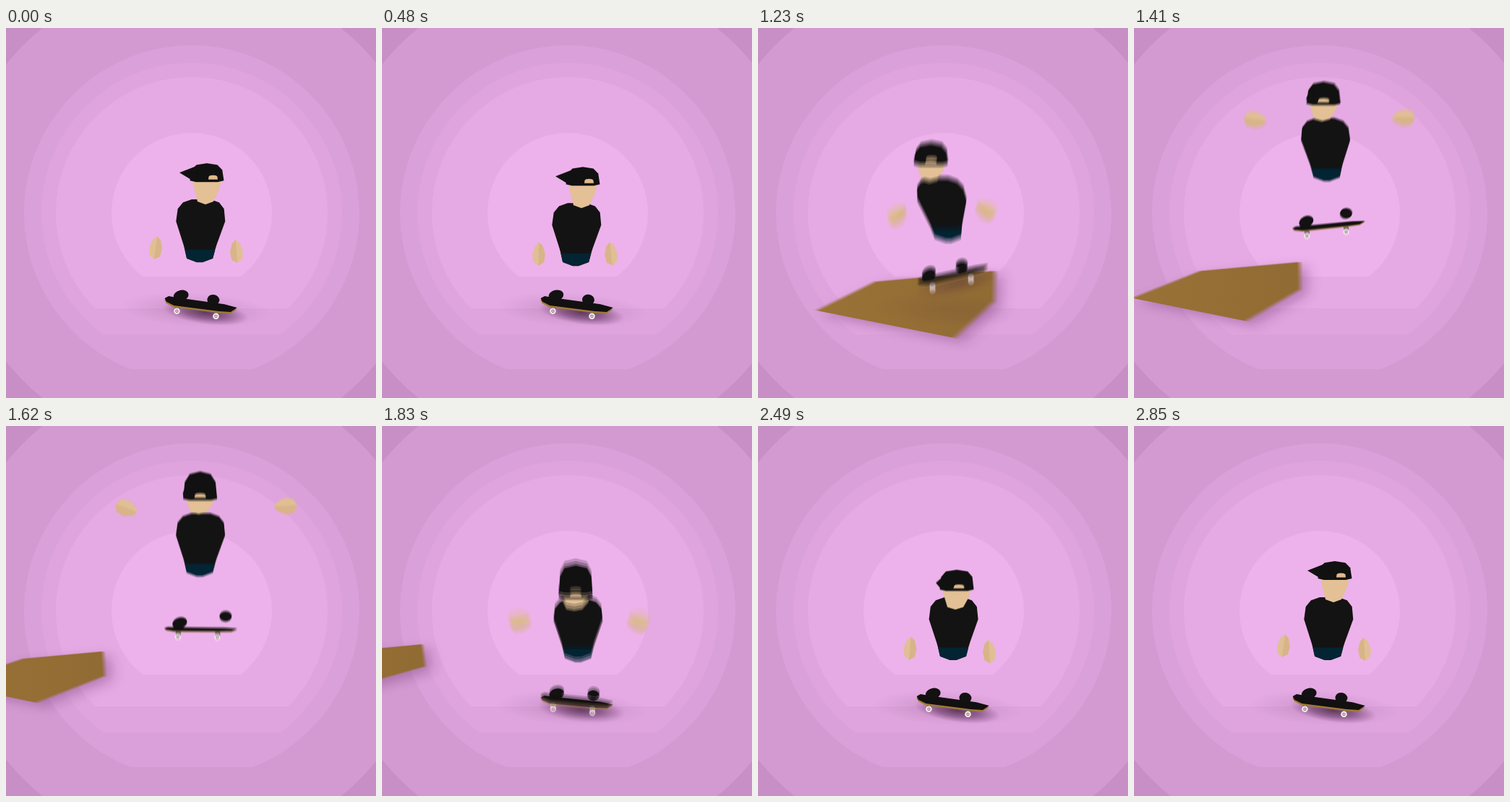
Animation, 512 px wide and 512 px high, one loop 2.88 s. Source, as an HTML page with a canvas:

```html
<!DOCTYPE html>
<html lang="en">
<head>
<meta charset="utf-8">
<title>Skater</title>
<style>
html, body { margin: 0; width: 100%; height: 100%; overflow: hidden; background: #d39ad2; }
canvas { display: block; width: 100vw; height: 100vh; }
</style>
</head>
<body>
<canvas id="stage" width="512" height="512"></canvas>
<script>
const SIZE = 512, LOOP = 2880, STEP = 30, SAMPLES = 5, SHUTTER = 14;
const RAD = Math.PI / 180;
const { sin, cos, abs, sign, sqrt, max, min, exp, PI } = Math;

function layer() {
  const c = document.createElement('canvas');
  c.width = c.height = SIZE;
  return c;
}
const out = document.getElementById('stage').getContext('2d');
const scene = layer();
const g = scene.getContext('2d');

const lerp = (a, b, k) => a + (b - a) * k;
const clamp = v => max(0, min(1, v));
const bump = (t, mid, width) => exp(-(((t - mid) / width) ** 2));
const ease = (t, from, to) => {
  const k = clamp((t - from) / (to - from));
  return k * k * (3 - 2 * k);
};

function poly(points, fill) {
  g.beginPath();
  for (const [x, y] of points) g.lineTo(x, y);
  g.closePath();
  g.fillStyle = fill;
  g.fill();
}

function oval(x, y, rx, ry, angle, fill) {
  g.beginPath();
  g.ellipse(x, y, rx, ry, angle * RAD, 0, 2 * PI);
  g.fillStyle = fill;
  g.fill();
}

function placed(x, y, angle, draw) {
  g.save();
  g.translate(x, y);
  g.rotate(angle * RAD);
  draw();
  g.restore();
}

function softOval(x, y, rx, ry, angle, alpha) {
  placed(x, y, angle, () => {
    g.scale(rx, ry);
    const glow = g.createRadialGradient(0, 0, 0, 0, 0, 1);
    glow.addColorStop(0, `rgba(62,28,60,${alpha})`);
    glow.addColorStop(.5, `rgba(72,32,70,${alpha * .62})`);
    glow.addColorStop(1, 'rgba(90,40,90,0)');
    oval(0, 0, 1, 1, 0, glow);
  });
}

// Upper half of a faceted, slightly boxy oval
function dome(x, y, rx, h, boxy) {
  const bend = v => sign(v) * abs(v) ** boxy;
  return Array.from({ length: 7 }, (_, i) => {
    const a = PI * (1 + i / 6);
    return [x + rx * bend(cos(a)), y + h * bend(sin(a))];
  });
}

// Light discs, each cut off where the floor begins
function makeBackdrop() {
  const c = layer(), b = c.getContext('2d');
  b.fillStyle = '#c88ec6';
  b.fillRect(0, 0, SIZE, SIZE);
  const discs = [
    [329, 575, '#d39ad2'], [232, 472, '#daa0d9'], [208, 424, '#dfa4dd'],
    [188, 388, '#e5aae4'], [111, 344, '#edb2eb']
  ];
  for (const [r, floor, fill] of discs) {
    b.save();
    b.beginPath();
    b.rect(0, 0, SIZE, floor);
    b.clip();
    b.fillStyle = fill;
    b.beginPath();
    b.arc(257, 256, r, 0, 2 * PI);
    b.fill();
    b.restore();
  }
  return c;
}
const backdrop = makeBackdrop();

// Every moving value follows from a few pulses in time
function poseAt(t) {
  const lift = max(0, 115 - .00108 * (t - 1505) ** 2);
  const ready = bump(t, 980, 450);
  const lean = bump(t, 1150, 220);
  const tilt = bump(t, 1200, 250);
  const air = bump(t, 1580, 230);
  const land = bump(t, 1970, 120);
  const recover = 1 - ease(t, 2180, 2680);
  const turn = (ease(t, 1000, 1240) + ease(t, 1300, 1950)) * recover;
  const bow = ease(t, 1700, 1960) * recover;
  const raise = ease(t, 1080, 1500) * (1 - ease(t, 1680, 1980));
  const swing = sqrt(raise);

  const ground = 382 - 8 * tilt;
  const x = 269 - 23 * lean + 3 * bow;
  const y = ground - 145 - lift + 18 * ready - 18 * air + 28 * land;
  return {
    board: { x: 270, y: ground - lift, angle: 7.5 - 20 * tilt - 6 * air,
             depth: 1 - .3 * tilt - .55 * air },
    contact: clamp(1 - lift / 90),
    tilt, ready, air, turn, bow,
    body: { x, y, hipX: 267 - 5 * lean + 6 * bow, hipY: y + 87 },
    head: { x: x + 9 - 14 * lean - 6 * turn,
            y: y - 26 + 6 * min(1, turn) + 35 * bow },
    hands: [
      { x: x + lerp(-62 + 34 * ready + 8 * bow, -102, raise),
        y: y + lerp(67 + 12 * ready + 11 * bow, -7, raise),
        angle: 8 - 22 * ready - 10 * bow + 105 * swing, flip: 1 },
      { x: x + lerp(50 - 7 * ready, 118, raise),
        y: y + lerp(72 - 6 * ready + 10 * bow, -10, raise),
        angle: -4 - 6 * ready - 88 * swing, flip: -1 }
    ].map(h => ({ ...h, width: 1 + .28 * swing }))
  };
}

// Corners [x, y, speed x, speed y], receding towards the left
const corners = [
  [81, 391, -.51, -.105], [162, 351, -.43, -.09], [328, 336, -.6, -.075],
  [327, 378, -.59, -.1], [272, 429, -.714, -.143]
];

function drawRamp(t) {
  if (t < 570 || t > 2100) return;
  const age = t - 1230, s = age / (1 + .00054 * age);
  const p = corners.map(([x, y, vx, vy]) => [x + vx * s, y + vy * s]);
  const wood = g.createLinearGradient(p[0][0], 0, p[2][0], 0);
  wood.addColorStop(0, '#9a7237');
  wood.addColorStop(1, '#906b33');
  g.save();
  g.shadowColor = 'rgba(115,55,115,.38)';
  g.shadowBlur = 16;
  g.shadowOffsetX = 10;
  g.shadowOffsetY = 6;
  poly(p, wood);
  g.restore();
}

const deck = [[-51, -1.4], [-46, -5], [-35, -4.5], [32, -4], [50, -1.5],
              [42, 5.5], [26, 6.6], [-37, 7], [-48, 3]];

function drawBoard({ board, contact, tilt, ready, air }) {
  const { x, y, angle, depth } = board;
  softOval(262, 390, 105, 24, 3, .14 * contact);
  softOval(x + 6, y + 12, 60, 16, angle, (.75 - .25 * tilt) * contact);
  placed(x, y, angle, () => {
    const axle = 9 + 5 * depth;
    for (const wx of [-32, 22.5]) {
      g.fillStyle = '#75666c';
      g.fillRect(wx - 3, 3, 7, axle - 4);
      oval(wx, axle, 4.3, 4.3, 0, '#f4e9ef');
      oval(wx, axle, 2.2, 2.2, 0, '#a07d86');
      oval(wx, axle, 1, 1, 0, '#f4e9ef');
    }
    g.save();
    g.scale(1, depth);
    g.translate(0, 2.4);
    poly(deck, '#a17a35');
    g.translate(0, -2.4);
    poly(deck, '#121010');
    g.restore();
    oval(-29 - 5 * ready, -8, 10.5, 7.5, -20, '#131112');
    oval(16 - 5 * ready + 19 * air, -8 - 10 * air, 8.5, 7.2, 0, '#131112');
  });
}

// Half outline of the torso: [height share, half width]
const outline = [[0, 13], [.05, 25], [.15, 32], [.35, 34], [.72, 23], [.8, 21], [.94, 18], [1, 4]];

function drawTorso({ x, y, hipX, hipY }) {
  const side = (rows, s) => rows.map(([v, w]) =>
    [lerp(x, hipX, v) + 1 + s * w, lerp(y, hipY, v)]);
  const both = rows => [...side(rows, 1), ...side(rows, -1).reverse()];
  poly(both(outline), '#141313');
  poly(both(outline.slice(5)), '#032433');
}

function drawHand({ x, y, angle, flip, width }) {
  const rim = Array.from({ length: 9 }, (_, i) => {
    const a = (i / 8 - .25) * 2 * PI;
    return [8.8 * cos(a) * (1 + .25 * sin(a)), 16 * sin(a)];
  });
  placed(x, y, angle, () => {
    g.scale(flip * width, 1);
    poly(rim, '#e1bf94');
    poly(rim.slice(0, 5), '#d8b488');
  });
}

function drawHead({ head, turn, bow }) {
  const side = clamp(1 - turn), chin = 33 - 8 * turn;
  const crown = 24 + 5 * min(1, turn) + 18 * max(0, turn - 1);
  placed(head.x, head.y, 0, () => {
    poly([[-20, -1], [20, -1], [17, .36 * chin], [9, .88 * chin],
          [-2, chin], [-13, .88 * chin], [-17, .4 * chin]], '#e3c096');
    const cap = dome(0, 0, 23.5, crown, .7 - .2 * bow);
    poly([...cap, [15, 2], [-15, 2]], '#121111');
    poly([[-24 - 14 * side, -8 - 3 * side], [-13, -.86 * crown], [-15, 1], [-23, -2]], '#121111');
    poly(dome(8.5 * side, -1.5, 8 - 1.5 * side, 6 - 2 * bow, .6), '#dfba8c');
  });
}

function drawScene(t) {
  const pose = poseAt(t);
  g.drawImage(backdrop, 0, 0);
  drawRamp(t);
  drawBoard(pose);
  drawTorso(pose.body);
  pose.hands.forEach(drawHand);
  drawHead(pose);
}

// Averages a few moments around the current step for motion blur
function frame(now) {
  const t = Math.floor((now % LOOP) / STEP) * STEP;
  for (let i = 0; i < SAMPLES; i++) {
    const shift = (i / (SAMPLES - 1) - .5) * SHUTTER;
    drawScene((t + shift + LOOP) % LOOP);
    out.globalAlpha = 1 / (i + 1);
    out.drawImage(scene, 0, 0);
  }
  requestAnimationFrame(frame);
}
requestAnimationFrame(frame);
</script>
</body>
</html>
```
